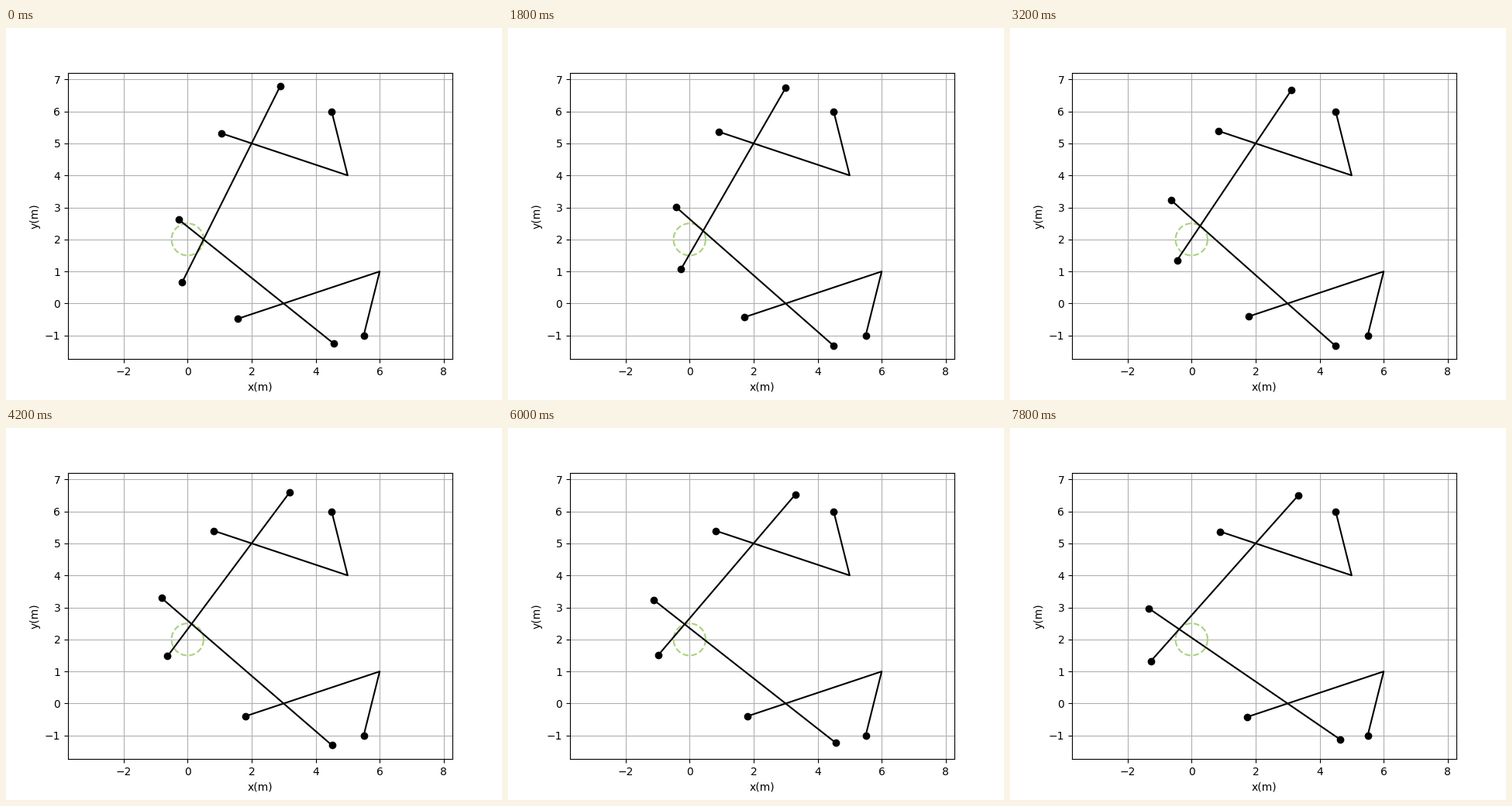
Recreate the animation shown at these times as a matplotlib script. Size 640 by 480 pixels, loop 8000 ms.

```python
import numpy as np
import matplotlib.pyplot as plt
from matplotlib.animation import FuncAnimation

FRAMES, INTERVAL = 40, 200
STEPS_PER_TURN = 100
CENTER, RADIUS = np.array([0.0, 2.0]), 0.5
TAIL = 2.0

# Each side: base point, fixed elbow and pivot of the sliding arm
LOW = [np.array(p) for p in ((5.5, -1.0), (6.0, 1.0), (3.0, 0.0))]
HIGH = [np.array(p) for p in ((4.5, 6.0), (5.0, 4.0), (2.0, 5.0))]

fig, ax = plt.subplots(figsize=(6.4, 4.8), dpi=100)
ax.set_xlim(-3.734, 8.271)
ax.set_ylim(-1.736, 7.209)
ax.set_xlabel("x(m)")
ax.set_ylabel("y(m)")
ax.grid()

turn = np.linspace(0, 2 * np.pi, 100)
ax.plot(CENTER[0] + RADIUS * np.cos(turn), CENTER[1] + RADIUS * np.sin(turn),
        "--", color="#aad27d", lw=1.5)

arms = [ax.plot([], [], "ko-", lw=1.5)[0] for _ in range(2)]
links = [ax.plot([], [], "ko-", lw=1.5, markevery=2)[0] for _ in range(2)]


def unit(v):
    return v / np.hypot(*v)


def set_side(arm, link, side, foot, arm_ext, link_ext):
    base, elbow, pivot = side
    along = unit(foot - pivot)
    arm.set_data(*np.transpose([pivot - TAIL * along, foot + arm_ext * along]))
    end = pivot + link_ext * unit(pivot - elbow)
    link.set_data(*np.transpose([base, elbow, end]))


def update(i):
    angle = 2 * np.pi * i / STEPS_PER_TURN
    foot = CENTER + RADIUS * np.array([np.cos(angle), np.sin(angle)])
    # The two overhangs share a constant total, split by the height
    a = foot[1] / 2
    b = 2.5 - a
    set_side(arms[0], links[0], LOW, foot, a, b)
    set_side(arms[1], links[1], HIGH, foot, b, a)
    return arms + links


anim = FuncAnimation(fig, update, frames=FRAMES, interval=INTERVAL,
                     init_func=lambda: update(0), repeat=True, repeat_delay=0)
plt.show()
```
